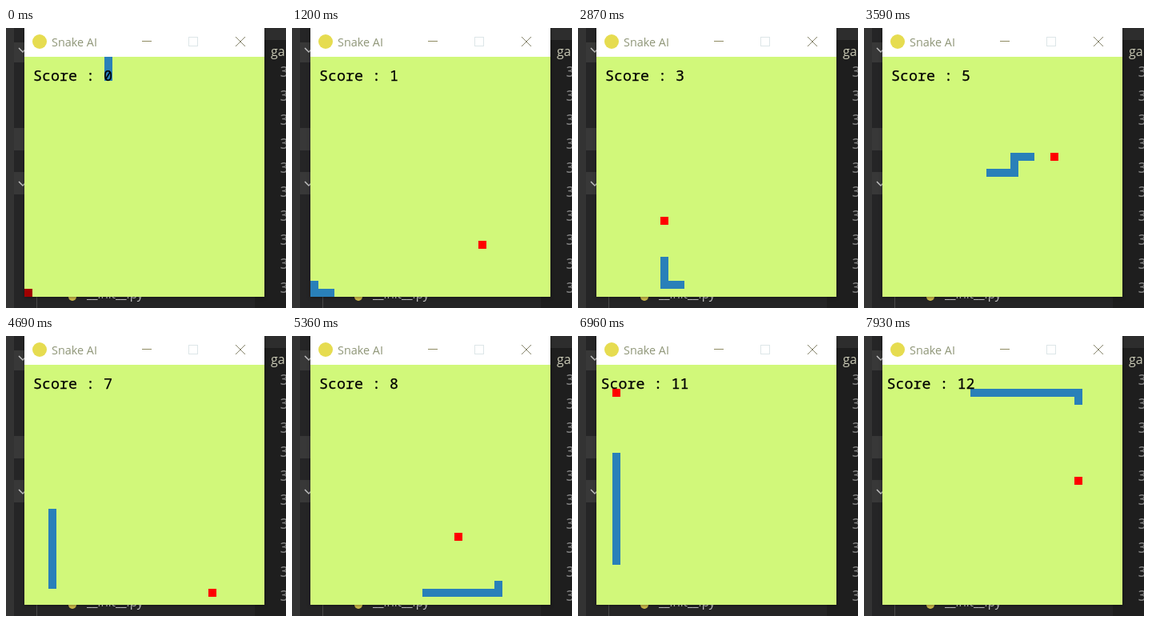
Recreate the animation shown at these times as an HTML page. Size 350 by 350 pixels, loop 7990 ms.

```html
<!DOCTYPE html>
<html lang="en">
<head>
<meta charset="utf-8">
<title>Snake AI</title>
<style>
  html, body { margin: 0; width: 100%; height: 100%; overflow: hidden; background: #1e1e1e; }
  svg { display: block; width: 100vw; height: 100vh; }
  .ui { font-family: "Open Sans", "Noto Sans", sans-serif; }
  .mono { font-family: "Noto Sans Mono", "DejaVu Sans Mono", monospace; }
  .window { filter: drop-shadow(0 1px 2px rgba(0, 0, 0, .4)); }
</style>
</head>
<body>
<svg viewBox="0 0 350 350">
  <!-- editor behind the window -->
  <g shape-rendering="crispEdges">
    <rect width="350" height="350" fill="#1e1e1e"/>
    <rect width="311" height="350" fill="#252526"/>
    <rect width="10" height="350" fill="#333333"/>
    <rect x="10" y="18" width="20" height="25" fill="#383838"/>
    <rect x="10" y="125" width="20" height="28" fill="#383838"/>
    <rect x="10" y="180" width="20" height="28" fill="#383838"/>
    <rect x="311" width="39" height="15" fill="#2d2d2d"/>
    <rect x="38" y="330" width="1" height="20" fill="#4a4a4a"/>
  </g>
  <path d="M16 25l5 5 5-5M16 192l5 5 5-5" fill="none" stroke="#c5c5c5" stroke-width="1.4"/>
  <text class="ui" x="331" y="35" font-size="16" fill="#c8c8b4">ga</text>
  <g id="lines" class="mono" font-size="18.3" fill="#858585"></g>
  <circle cx="83" cy="336" r="5" fill="#d2c04c"/>
  <text class="ui" x="101" y="338" font-size="15.2" fill="#cccccc">__init__.py</text>

  <!-- game window -->
  <rect class="window" x="23" width="300" height="336" fill="#fff"/>
  <circle cx="42" cy="17" r="9" fill="#e6dc50"/>
  <text class="ui" x="57" y="23" font-size="14.4" fill="#8f9678">Snake AI</text>
  <g fill="none" stroke-width="1">
    <path d="M170 16.5h12" stroke="#8f8b62"/>
    <rect x="228.5" y="11.5" width="11" height="11" stroke="#dde6e8"/>
    <path d="M287 11l12 12M299 11l-12 12" stroke="#86846c"/>
  </g>
  <g shape-rendering="crispEdges">
    <rect x="23" y="36" width="300" height="300" fill="#d1f87a"/>
    <path id="snake" fill="#2980b9"/>
    <rect id="apple" width="10" height="10"/>
  </g>
  <text id="score" class="mono" x="83.5" y="66" font-size="18.33" text-anchor="middle"
    stroke="#000" stroke-width=".25"></text>
</svg>
<script>
const LOOP = 7990, CELL = 10, LEFT = 23, TOP = 36, START = 3;
const $ = id => document.getElementById(id);

// Cells the snake steers to; those marked VIA hold no apple.
const VIA = true;
const stops = [
  [0, 29], [21, 23], [24, 27], [24, 28, VIA], [8, 20], [16, 14], [16, 12, VIA], [21, 12], [3, 16],
  [23, 28], [18, 21], [18, 20, VIA], [4, 20], [5, 21, VIA], [5, 26], [2, 3], [24, 14]
];

// Keep straight on while that closes the gap, otherwise turn towards the stop.
const trail = [[10, 0], [10, 1], [10, 2]];
const apples = [];
let pos = [10, 2], axis = 1, dir = 1;
for (const [x, y, via] of stops) {
  const stop = [x, y];
  const way = a => Math.sign(stop[a] - pos[a]);
  while (way(0) || way(1)) {
    if (way(axis) !== dir) {
      axis = 1 - axis;
      dir = way(axis);
    }
    pos = [...pos];
    pos[axis] += dir;
    trail.push(pos);
  }
  if (!via) apples.push({ cell: stop, at: trail.length - 1 });
}

// Steady pace with a slight sway, in moves.
const movesAt = s => Math.floor(32.11 * s + 0.35 * Math.sin(2 * Math.PI * s / 4.8));

const px = ([x, y]) => [LEFT + x * CELL, TOP + y * CELL];

function draw(t) {
  const end = movesAt(t / 1000) + START;
  const score = apples.filter(a => a.at < end).length;
  const body = trail.slice(end - START - score, end);
  const [x, y] = px(apples[score].cell);
  $("snake").setAttribute("d", body.map(c => `M${px(c)}h10v10h-10z`).join(""));
  $("apple").setAttribute("x", x);
  $("apple").setAttribute("y", y);
  $("apple").setAttribute("fill", score ? "#ff0000" : "#a00000");
  $("score").textContent = `Score : ${score}`;
}

$("lines").innerHTML = Array.from({ length: 10 }, (_, i) =>
  `<text x="342" y="${61 + i * 30}">3</text>`).join("");

const begin = performance.now();
function tick() {
  draw((performance.now() - begin) % LOOP);
  requestAnimationFrame(tick);
}
tick();
</script>
</body>
</html>
```
